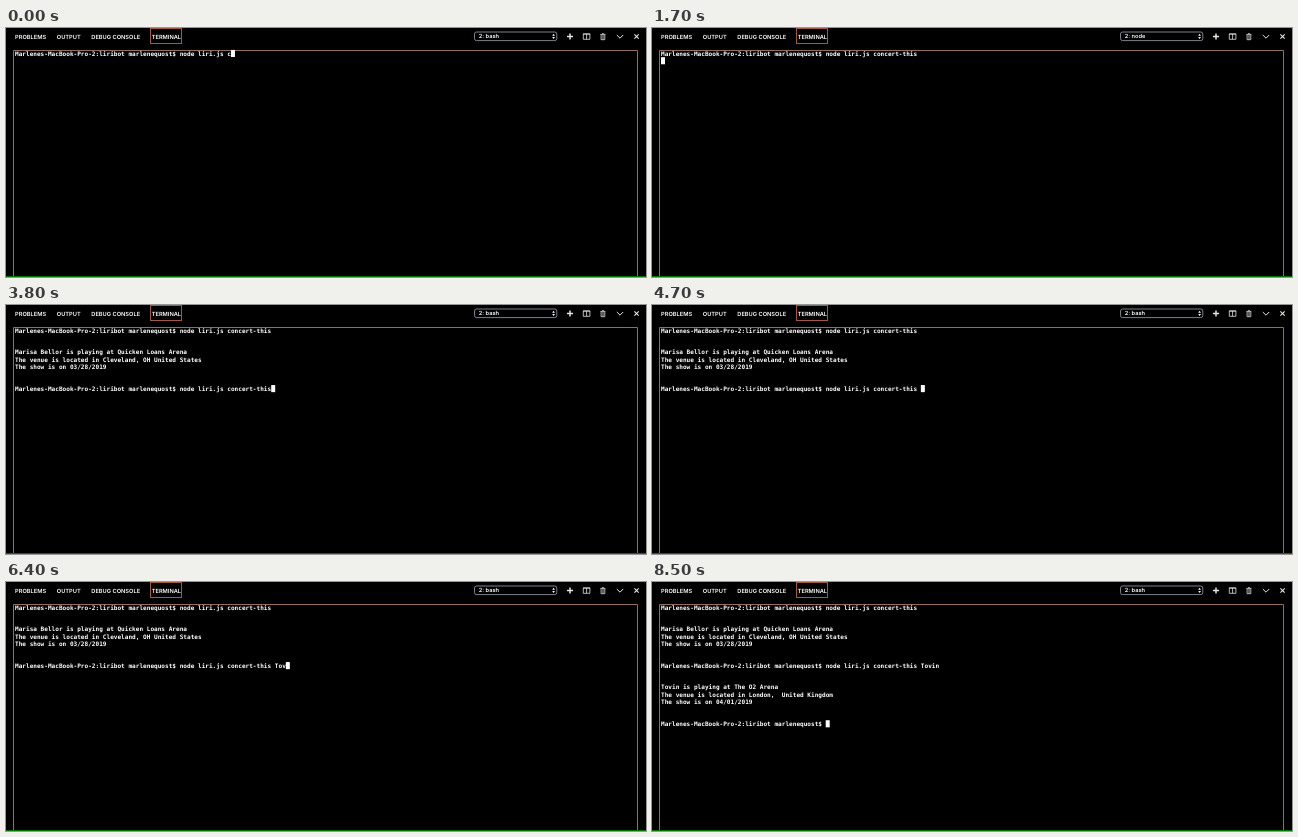
An HTML page that plays this animation: 640x249 px, repeating every 9.8 s.

```html
<!DOCTYPE html>
<html lang="en">
<head>
<meta charset="utf-8">
<title>Terminal session</title>
<style>
  html, body { margin: 0; width: 100%; height: 100%; overflow: hidden; background: #000; }
  svg { display: block; width: 100vw; height: 100vh; }
  text { fill: #fff; white-space: pre; text-rendering: geometricPrecision; }
  .ui text { font: 600 5.7px Inter, "Open Sans", sans-serif; }
  #rows text { font: bold 6.08px "DejaVu Sans Mono", "Liberation Mono", monospace; }
  .frame { fill: none; stroke: #946e5e; stroke-width: 1; }
  .tab { fill: none; stroke: #a05a42; stroke-width: 1; }
  .icon { fill: none; stroke: #e4e4e4; stroke-width: .8; }
</style>
</head>
<body>
<svg viewBox="0 0 640 249" preserveAspectRatio="none">
  <rect width="640" height="249"/>
  <g class="ui">
    <text x="9" y="10.6">PROBLEMS</text>
    <text x="50.8" y="10.6">OUTPUT</text>
    <text x="85.3" y="10.6">DEBUG CONSOLE</text>
    <text x="145.7" y="10.6">TERMINAL</text>
    <rect class="tab" x="144.5" y=".5" width="31" height="15"/>
    <rect class="icon" x="468.5" y="4" width="82.3" height="8.6" rx="2" style="stroke:#9aa2b0"/>
    <text id="shell" x="472.8" y="10.4"></text>
    <path d="M546.2 7.7l1.4-2 1.4 2zM546.2 9l1.4 2 1.4-2z" fill="#fff"/>
  </g>
  <g class="icon">
    <path d="M561 8.5h6M564 5.5v6" stroke-width="1.5"/>
    <path d="M577.3 6h6.6v5.3h-6.6zM580.6 6v5.3M577 6h7.2"/>
    <path d="M594.4 6.4h5M596 5.7h1.9M595.1 6.6v5.1h3.7V6.6M597 7v4.4"/>
    <path d="M610.8 7l3.2 3.2 3.2-3.2" stroke-width="1"/>
    <path d="M628.4 6.3l4.3 4.3M632.7 6.3l-4.3 4.3" stroke-width="1.1"/>
  </g>
  <path class="frame" d="M7.5 249V22.5H631.5V249"/>
  <g id="rows"></g>
  <rect id="cursor" width="4" height="7.1" fill="#fff"/>
  <rect y="248" width="640" height="1" fill="#007000"/>
</svg>
<script>
  const LOOP = 9800, LEFT = 9, TOP = 21.9, CELL = 3.66, PITCH = 7.27, ROWS = 17;
  const PROMPT = "Marlenes-MacBook-Pro-2:liribot marlenequost$ ";
  const COMMAND = "node liri.js concert-this";

  // Each pair is [start in ms, value].
  const firstLength = [[0, 14], [100, 15], [200, 16], [300, 17], [400, 18], [500, 19],
    [600, 20], [900, 21], [1000, 22], [1100, 23], [1200, 25]];
  const secondInput = [[0, ""], [3800, COMMAND], [4700, COMMAND + " "],
    [4800, COMMAND + " T"], [5200, COMMAND + " "], [6000, COMMAND + " T"],
    [6300, COMMAND + " To"], [6400, COMMAND + " Tov"],
    [7200, COMMAND + " Tovi"], [7300, COMMAND + " Tovin"]];
  const shellName = [[0, "bash"], [1700, "node"], [3100, "bash"], [7700, "node"], [8500, "bash"]];

  const valueAt = (steps, t) => steps.filter(([start]) => start <= t).pop()[1];

  function screenAt(t) {
    const lines = [PROMPT + COMMAND.slice(0, valueAt(firstLength, t))];
    if (t >= 1400) lines.push("");
    if (t >= 2900) lines.push("",
      "Marisa Bellor is playing at Quicken Loans Arena",
      "The venue is located in Cleveland, OH United States", "");
    if (t >= 3000) {
      lines[5] = "The show is on 03/28/2019";
      lines.push("", "", PROMPT + valueAt(secondInput, t));
    }
    if (t >= 7500) lines.push("");
    if (t >= 8400) lines.push("",
      "Tovin is playing at The O2 Arena",
      "The venue is located in London,  United Kingdom",
      "The show is on 04/01/2019", "", "", PROMPT);
    return lines;
  }

  const byId = id => document.getElementById(id);
  const rows = Array.from({ length: ROWS }, (_, i) => {
    const row = document.createElementNS("http://www.w3.org/2000/svg", "text");
    row.setAttribute("x", LEFT);
    row.setAttribute("y", TOP + 5.6 + i * PITCH);
    return byId("rows").appendChild(row);
  });

  function setText(node, text) {
    if (node.textContent !== text) node.textContent = text;
  }

  function draw() {
    const t = performance.now() % LOOP;
    const lines = screenAt(t);
    const last = lines.length - 1;
    rows.forEach((row, i) => setText(row, lines[i] || ""));
    setText(byId("shell"), "2: " + valueAt(shellName, t));
    byId("cursor").setAttribute("x", LEFT + lines[last].length * CELL);
    byId("cursor").setAttribute("y", TOP + last * PITCH);
    requestAnimationFrame(draw);
  }
  draw();
</script>
</body>
</html>
```
